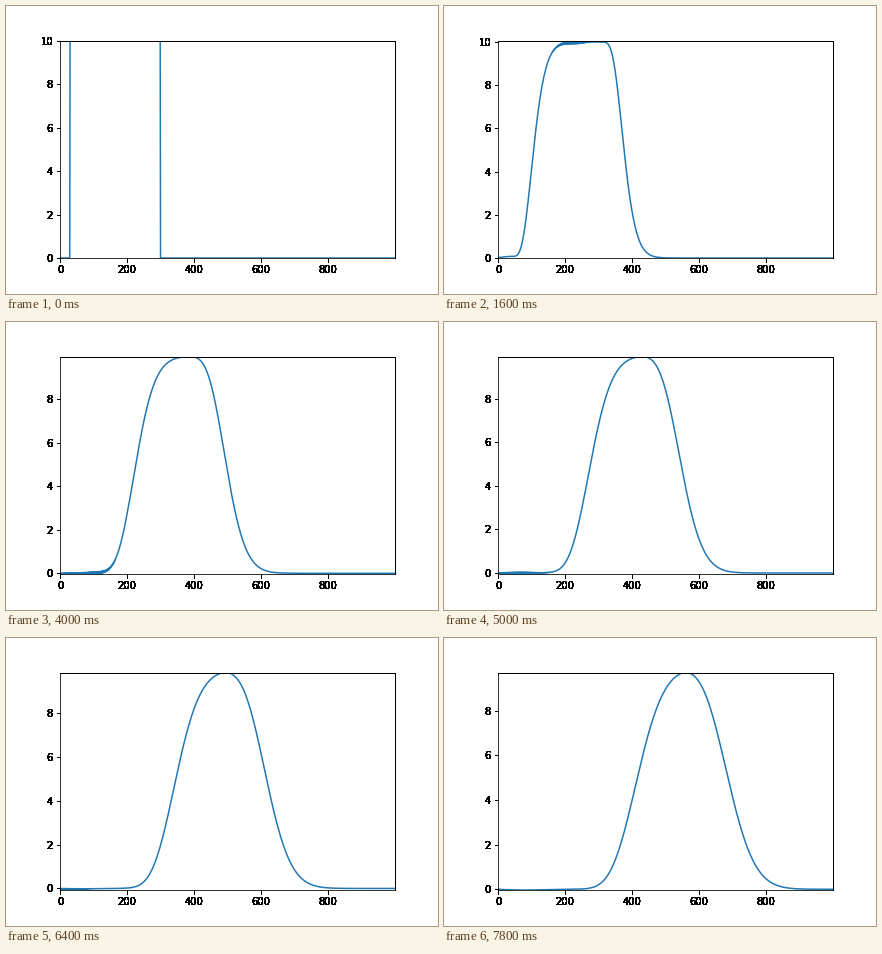
A matplotlib script that plays this animation: 432 px wide and 288 px high, repeating every 8000 ms.

```python
"""A square pulse carried to the right by an implicit central scheme."""
import numpy as np
import matplotlib.pyplot as plt
from matplotlib.animation import FuncAnimation
from matplotlib.artist import Artist

CELLS, STEPS, COURANT = 1000, 40, 10


def simulate():
    """Backward Euler in time, central in space, zero outside the grid."""
    half = COURANT / 2
    matrix = (np.eye(CELLS) + half * np.eye(CELLS, k=1)
              - half * np.eye(CELLS, k=-1))
    step = np.linalg.inv(matrix)
    u = np.zeros(CELLS)
    u[30:300] = 10
    states = [u]
    for _ in range(STEPS - 1):
        states.append(step @ states[-1])
    return states


class SolidInk(Artist):
    """Redraws ticks and outer spines until their soft edges turn solid."""
    passes = 20
    zorder = 6

    def draw(self, renderer):
        ax = self.axes
        parts = ax.xaxis.get_major_ticks() + ax.yaxis.get_major_ticks()
        parts += [ax.spines["top"], ax.spines["right"]]
        for part in parts:
            for _ in range(self.passes):
                part.draw(renderer)


fig = plt.figure(figsize=(6, 4), dpi=72, facecolor="white")
ax = fig.add_axes([0.125, 0.125, 0.775, 0.755])
ax.set_xticks(range(0, CELLS, 200))
ax.set_xlim(0, CELLS - 1)
line, = ax.plot([], [], color="#1f77b4", lw=1.5)
ax.add_artist(SolidInk())

states = simulate()
cells = np.arange(CELLS)


def update(i):
    u = states[i]
    low, high = u.min(), u.max()
    line.set_data(cells, u)
    ax.set_yticks(np.arange(0, high + 1e-9, 2).astype(int))
    ax.set_ylim(low, high)
    return line,


anim = FuncAnimation(fig, update, frames=STEPS, interval=200,
                     init_func=lambda: update(0), repeat=True,
                     repeat_delay=0, blit=False)
plt.show()
```
